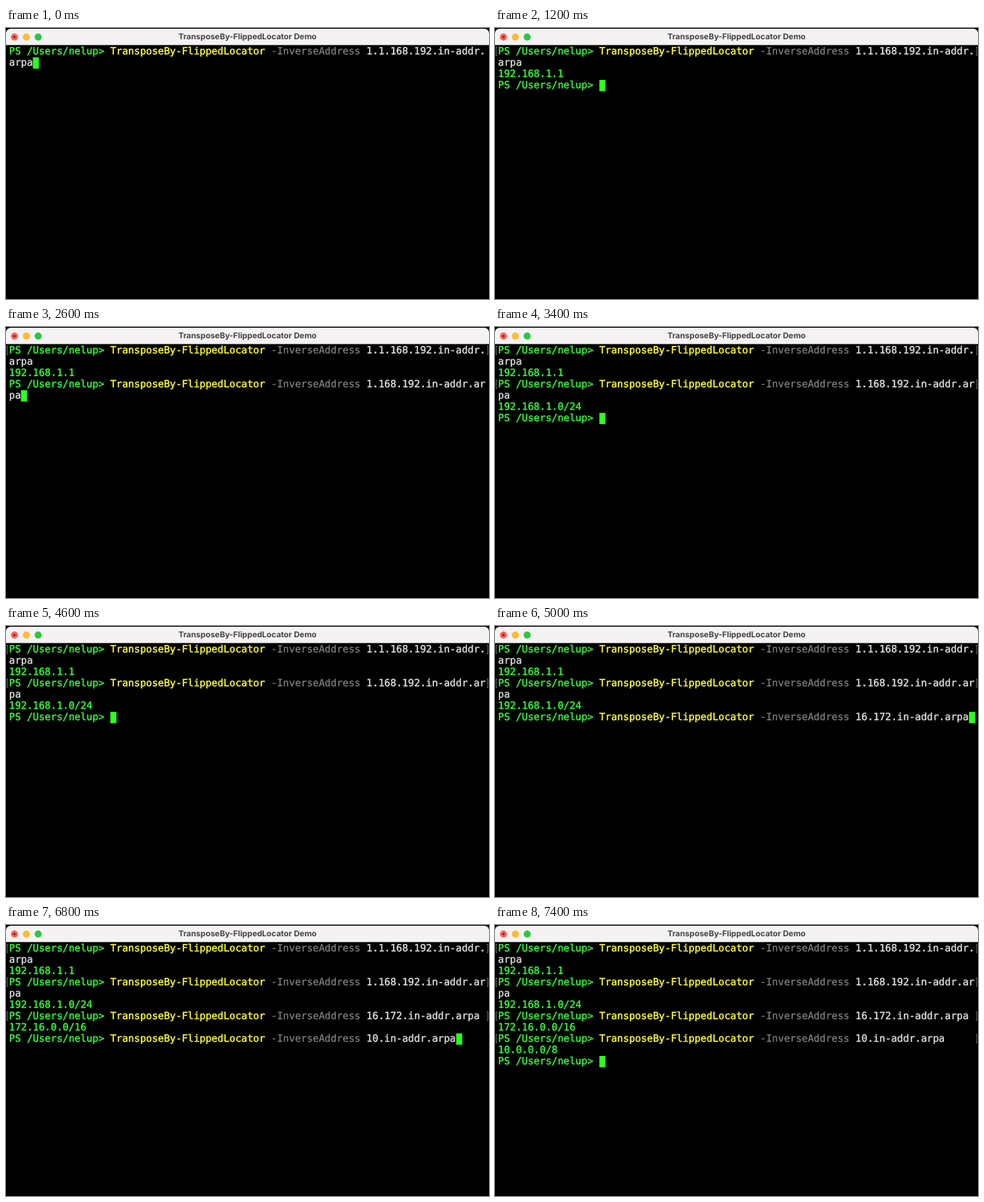
These frames come from a looping animation (640 by 360 pixels, 8000 ms). An HTML page:

```html
<!DOCTYPE html>
<html lang="en">
<head>
<meta charset="utf-8">
<title>Terminal demo</title>
<style>
  html, body { margin: 0; width: 100%; height: 100%; overflow: hidden; background: #000; }
  .stage { position: relative; width: 640px; height: 360px; overflow: hidden; background: #000; }

  .bar {
    position: absolute; inset: 1px 0 auto; height: 22px; box-sizing: border-box;
    border-radius: 6px 6px 0 0; background: #f5f2f3; border-bottom: 1px solid #a3a1a2;
    font: 700 10.6px/21px Inter, sans-serif; color: #454344; text-align: center;
    text-rendering: geometricPrecision;
  }
  .bar svg { position: absolute; left: 0; top: 0; }

  .row { position: absolute; left: 4px; top: calc(24px + 15px * var(--r)); }
  .row {
    white-space: pre; color: #33ff33;
    font: 13.12px/15px "DejaVu Sans Mono", monospace;
    -webkit-text-stroke: 0.4px currentColor;
    text-rendering: geometricPrecision;
  }
  .cmd { color: #ffff33; }
  .opt { color: #808080; -webkit-text-stroke-width: 0.25px; }
  .arg { color: #dedede; }

  /* Brackets at both edges of a finished prompt row */
  .mark::before, .mark::after {
    content: ""; position: absolute; top: calc(25px + 15px * var(--r));
    width: 2px; height: 12px; box-sizing: border-box; border: 1px solid #606060;
  }
  .mark::before { left: 1px; border-right: 0; }
  .mark::after { left: 637px; border-left: 0; }

  .cursor {
    position: absolute; left: 3.7px; top: calc(24px + 15px * var(--r));
    width: 8.3px; height: 15px; background: #2bff20;
    transform: translate(calc(7.9px * var(--c)), 0);
    animation: cursor 8s step-end infinite;
  }

  /* Each part stays hidden until its moment in the loop */
  .on1200 { animation: on1200 8s step-end infinite; }
  .on2600 { animation: on2600 8s step-end infinite; }
  .on3400 { animation: on3400 8s step-end infinite; }
  .on5000 { animation: on5000 8s step-end infinite; }
  .on5400 { animation: on5400 8s step-end infinite; }
  .on5600 { animation: on5600 8s step-end infinite; }
  .on6800 { animation: on6800 8s step-end infinite; }
  .on7400 { animation: on7400 8s step-end infinite; }
  @keyframes on1200 { 0% { visibility: hidden } 15%, 100% { visibility: visible } }
  @keyframes on2600 { 0% { visibility: hidden } 32.5%, 100% { visibility: visible } }
  @keyframes on3400 { 0% { visibility: hidden } 42.5%, 100% { visibility: visible } }
  @keyframes on5000 { 0% { visibility: hidden } 62.5%, 100% { visibility: visible } }
  @keyframes on5400 { 0% { visibility: hidden } 67.5%, 100% { visibility: visible } }
  @keyframes on5600 { 0% { visibility: hidden } 70%, 100% { visibility: visible } }
  @keyframes on6800 { 0% { visibility: hidden } 85%, 100% { visibility: visible } }
  @keyframes on7400 { 0% { visibility: hidden } 92.5%, 100% { visibility: visible } }

  /* --r is the text row, --c the column */
  @keyframes cursor {
    0%    { --r: 1;  --c: 4;  opacity: 1 }
    15%   { --r: 3;  --c: 17; opacity: 1 }
    30%   { --r: 3;  --c: 17; opacity: 0 }
    32.5% { --r: 4;  --c: 2;  opacity: 1 }
    42.5% { --r: 6;  --c: 17; opacity: 1 }
    62.5% { --r: 6;  --c: 79; opacity: 1 }
    67.5% { --r: 6;  --c: 79; opacity: 0 }
    70%   { --r: 8;  --c: 17; opacity: 1 }
    85%   { --r: 8;  --c: 75; opacity: 1 }
    92.5%, 100% { --r: 10; --c: 17; opacity: 1 }
  }
  @property --r { syntax: "<number>"; inherits: true; initial-value: 0; }
  @property --c { syntax: "<number>"; inherits: true; initial-value: 0; }
</style>
</head>
<body>
<div class="stage">
  <div class="bar">
    <svg width="60" height="21">
      <circle cx="11.2" cy="11" r="4.7" fill="#fe5f57"/>
      <circle cx="11.2" cy="11" r="1.6" fill="#8c1a10"/>
      <circle cx="26.9" cy="11" r="4.7" fill="#febc2e"/>
      <circle cx="42.6" cy="11" r="4.7" fill="#28c840"/>
    </svg>
    TransposeBy-FlippedLocator Demo
  </div>

  <div class="row" style="--r:0">PS /Users/nelup&gt; <span class="cmd">TransposeBy-FlippedLocator</span> <span class="opt">-InverseAddress</span> <span class="arg">1.1.168.192.in-addr.</span></div>
  <div class="row arg" style="--r:1">arpa</div>
  <div class="mark on1200" style="--r:0"></div>
  <div class="row on1200" style="--r:2">192.168.1.1</div>

  <div class="row on1200" style="--r:3">PS /Users/nelup&gt; <span class="on2600"><span class="cmd">TransposeBy-FlippedLocator</span> <span class="opt">-InverseAddress</span> <span class="arg">1.168.192.in-addr.ar</span></span></div>
  <div class="row arg on2600" style="--r:4">pa</div>
  <div class="mark on3400" style="--r:3"></div>
  <div class="row on3400" style="--r:5">192.168.1.0/24</div>

  <div class="row on3400" style="--r:6">PS /Users/nelup&gt; <span class="on5000"><span class="cmd">TransposeBy-FlippedLocator</span> <span class="opt">-InverseAddress</span> <span class="arg">16.172.in-addr.arpa</span></span></div>
  <div class="mark on5400" style="--r:6"></div>
  <div class="row on5600" style="--r:7">172.16.0.0/16</div>

  <div class="row on5600" style="--r:8">PS /Users/nelup&gt; <span class="on6800"><span class="cmd">TransposeBy-FlippedLocator</span> <span class="opt">-InverseAddress</span> <span class="arg">10.in-addr.arpa</span></span></div>
  <div class="mark on7400" style="--r:8"></div>
  <div class="row on7400" style="--r:9">10.0.0.0/8</div>

  <div class="row on7400" style="--r:10">PS /Users/nelup&gt;</div>
  <div class="cursor"></div>
</div>
</body>
</html>
```
